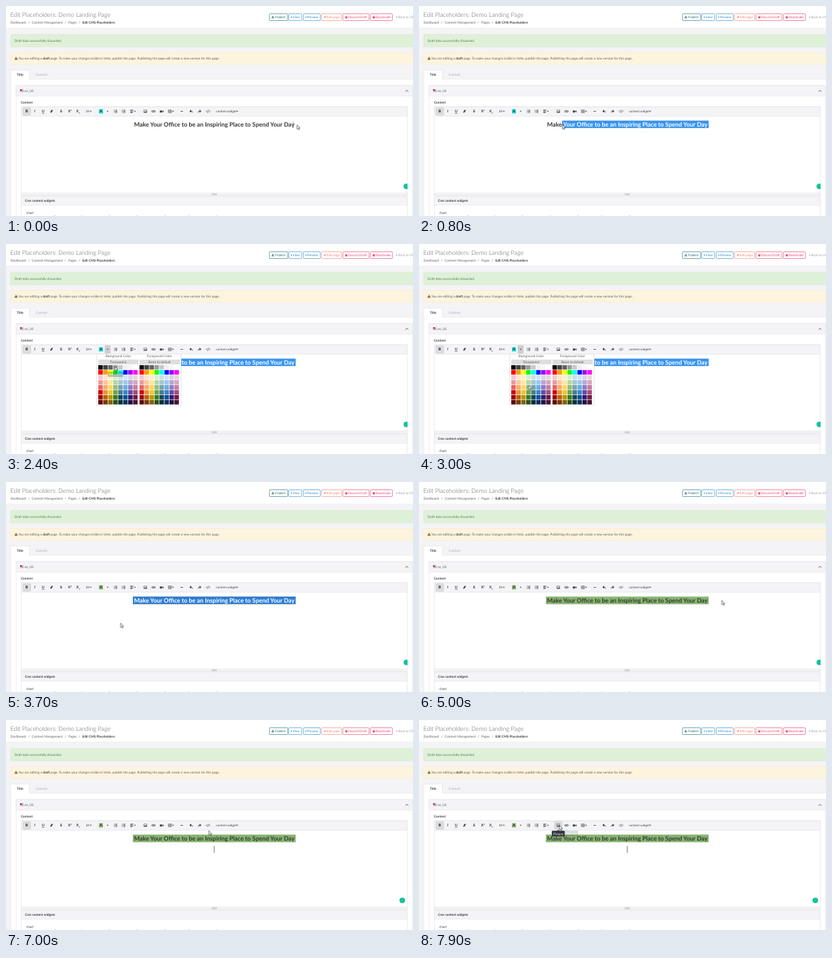
Write an HTML page that moves like this. It is 600 by 310 pixels and loops after 8 s.

```html
<!DOCTYPE html>
<html lang="en">
<head>
<meta charset="utf-8">
<title>Editor: text background colour</title>
<style>
html, body { margin: 0; width: 100%; height: 100%; overflow: hidden; background: #fff; }
svg { display: block; width: 600px; height: 310px; }
text { font: 4.78px Lato, sans-serif; fill: #555a5e; text-rendering: geometricPrecision; white-space: pre; }
.b { font-weight: 700; fill: #33373a; }
.mid { text-anchor: middle; }
.title { font-size: 8.95px; font-weight: 300; }
.line { fill: none; stroke: #3c4043; stroke-width: .8; }
.ico { fill: #3c4043; }
.box { stroke: #e4e4e7; stroke-width: .7; }
.head { font-size: 8.88px; font-weight: 700; text-anchor: middle; fill: inherit; }
.tip rect, .tip path { fill: #30353d; }
.tip text { fill: #fff; text-anchor: middle; }

/* One loop is 8 s: 1% = 80 ms */
.a { animation: 8s linear infinite; }
.hard { animation: 8s step-end infinite; }

#cursor { animation-name: cursor; animation-timing-function: ease-in-out; }
@keyframes cursor {
  0%, 3% { transform: translate(429px, 175.5px); }
  12% { transform: translate(187px, 175px); }
  14% { transform: translate(186px, 174px); }
  19%, 24% { transform: translate(149px, 153px); }
  29%, 32% { transform: translate(160.5px, 181px); }
  38%, 41.5% { transform: translate(161.5px, 209px); }
  45.5%, 47% { transform: translate(168.8px, 208.3px); }
  58%, 64% { transform: translate(446.5px, 174.8px); }
  70%, 81% { transform: translate(445.5px, 173.8px); }
  92% { transform: translate(222px, 158px); }
  95% { transform: translate(217px, 156px); }
  97%, 100% { transform: translate(207px, 156px); }
}
#sel { animation-name: drag, selOff; animation-duration: 8s; animation-iteration-count: infinite; animation-timing-function: ease-in-out, step-end; }
@keyframes drag {
  0%, 3% { clip-path: inset(0 0 0 100%); }
  12%, 100% { clip-path: inset(0 0 0 0); }
}
@keyframes selOff { 0% { visibility: visible; } 59.4%, 100% { visibility: hidden; } }
#selBox { animation-name: selTone; }
@keyframes selTone { 0% { fill: #3994ee; } 41.25%, 100% { fill: #2f7dd3; } }
#mark { animation-name: mark; }
@keyframes mark { 0% { visibility: hidden; } 41.25%, 100% { visibility: visible; } }
#swatch { animation-name: swatch; }
@keyframes swatch { 0% { fill: #1fe3dc; } 41.25%, 100% { fill: #94bd7b; } }
#menu { animation-name: menu; }
@keyframes menu { 0%, 41.25%, 100% { visibility: hidden; } 23.75% { visibility: visible; } }
#more { animation-name: more; }
@keyframes more { 0%, 41.25%, 100% { visibility: hidden; } 18% { visibility: visible; } }
#moreTip { animation-name: moreTip; }
@keyframes moreTip { 0%, 18.5%, 25%, 100% { opacity: 0; } 20.5%, 23.5% { opacity: 1; } }
#toneTip { animation-name: toneTip; }
@keyframes toneTip { 0%, 29%, 33%, 100% { opacity: 0; } 30%, 31.5% { opacity: .3; } }
#ibeam { animation-name: ibeam; }
@keyframes ibeam { 0% { visibility: visible; } 1.25%, 100% { visibility: hidden; } }
#caret { animation-name: caret; }
@keyframes caret {
  0%, 76.6%, 89.9% { visibility: hidden; }
  70%, 83.2%, 96.5%, 100% { visibility: visible; }
}
#dot { animation-name: dot; animation-timing-function: ease-in-out; }
@keyframes dot { 0%, 75% { transform: none; } 79%, 100% { transform: translateX(-6px); } }
#link { animation-name: link; }
@keyframes link { 0%, 96.2%, 100% { visibility: hidden; } 92.5% { visibility: visible; } }
#linkTip { animation-name: linkTip; }
@keyframes linkTip { 0%, 93%, 99.8%, 100% { opacity: 0; } 95%, 96.5% { opacity: .9; } 98.75% { opacity: .18; } }
#pic { animation-name: pic; }
@keyframes pic { 0% { visibility: hidden; } 96.2%, 100% { visibility: visible; } }
#picTip { animation-name: picTip; }
@keyframes picTip { 0%, 96.5% { opacity: 0; } 98.5%, 100% { opacity: 1; } }
</style>
</head>
<body>
<svg viewBox="0 0 600 310">
  <defs>
    <clipPath id="page"><rect x="22" y="163" width="569.5" height="112"/></clipPath>
    <text id="headline" class="head" x="307" y="178">Make Your Office to be an Inspiring Place to Spend Your Day</text>
    <path id="down" d="M-1.3-.7H1.3L0 .9Z"/>
  </defs>

  <!-- Page header -->
  <rect width="600" height="310" fill="#f4f3f5"/>
  <rect width="600" height="32.5" fill="#fff"/>
  <path d="M0 32.7H600" stroke="#e7eaec" stroke-width=".6"/>
  <text class="title" x="6.5" y="15.5">Edit Placeholders: Demo Landing Page</text>
  <text x="6.7" y="25.6">Dashboard</text><text x="32.8" y="25.6">/</text>
  <text x="38" y="25.6">Content Management</text><text x="86.5" y="25.6">/</text>
  <text x="92" y="25.6">Pages</text><text x="107.3" y="25.6">/</text>
  <text class="b" x="112.5" y="25.6">Edit CMS Placeholders</text>
  <g id="buttons"></g>

  <!-- Alerts -->
  <rect x="7" y="42" width="600" height="18.3" rx="1" fill="#dff0d8" stroke="#d3e7c4" stroke-width=".6"/>
  <text x="12.5" y="53" style="fill:#4b7b4c">Draft data successfully discarded.</text>
  <rect x="7" y="68.7" width="600" height="17.3" rx="1" fill="#fdf4de" stroke="#f8e8cb" stroke-width=".6"/>
  <path d="M12.3 79.3L14.8 74.7L17.3 79.3Z" fill="#6b5a35"/>
  <path d="M14.8 76V77.8M14.8 78.2V78.8" stroke="#fdf4de" stroke-width=".5"/>
  <text x="18.2" y="79">You are editing a <tspan class="b">draft</tspan> page. To make your changes visible in Velm, publish the page. Publishing the page will create a new version for this page.</text>

  <!-- Tabs and panels -->
  <rect class="box" x="7" y="108" width="600" height="210" fill="#fff"/>
  <path d="M7 109V94.5H34.5V109" fill="#fff"/>
  <path class="box" d="M7 108V94.5H34.5V108" fill="none"/>
  <text class="b" x="16" y="102.8">Title</text>
  <text x="44" y="102.8" style="fill:#a7acb8">Content</text>
  <rect class="box" x="15" y="117.5" width="584" height="200" fill="#fff"/>
  <rect class="box" x="15" y="117.5" width="584" height="15.5" fill="#f4f4f6"/>
  <g stroke-width=".55">
    <rect x="20.8" y="123" width="5" height="3.6" fill="#fff"/>
    <path d="M20.8 123.3h5m-5 1.1h5m-5 1.1h5m-5 1.1h5" stroke="#c8475a"/>
    <path d="M20.8 123h2.4v2h-2.4z" fill="#3c4a80"/>
  </g>
  <text x="27.2" y="126.6">en_US</text>
  <path class="line" d="M589 126.5L591 124.3L593 126.5"/>
  <text class="b" x="22" y="144.3">Content</text>
  <rect class="box" x="22.3" y="148.8" width="569" height="130.6" fill="#fff"/>
  <rect class="box" x="22.3" y="148.8" width="569" height="14" fill="#f4f4f6"/>
  <rect class="box" x="22.3" y="276" width="569" height="3.5" fill="#f4f4f6"/>
  <path d="M303 277h8m-8 .9h8m-8 .9h8" stroke="#a9a9ad" stroke-width=".45"/>
  <rect class="box" x="22.3" y="281" width="569" height="40" fill="#fff"/>
  <rect class="box" x="22.3" y="281" width="569" height="13" fill="#f4f4f6"/>
  <text class="b" x="28" y="289.3">Cms content widgets</text>
  <text x="30" y="306.8" style="fill:#33373a">chart</text>
  <path d="M71 309.8h2m38 0h1.5m39 0h2m39 0h2m39 0h2m33 0h2m39 0h2" stroke="#888" stroke-width=".5"/>

  <!-- Toolbar -->
  <rect x="25" y="150" width="11.3" height="11.2" rx="1" fill="#dcdcdf" stroke="#c6c6ca" stroke-width=".5"/>
  <rect id="more" class="hard" x="146" y="150" width="7.6" height="11.2" rx="1" fill="#cfcfd3" stroke="#b4b4b8" stroke-width=".5"/>
  <rect id="pic" class="hard" x="199.5" y="150" width="11.5" height="11.2" rx="1" fill="#dcdcdf" stroke="#c6c6ca" stroke-width=".5"/>
  <rect id="link" class="hard" x="212" y="150" width="11.5" height="11.2" rx="1" fill="#dcdcdf"/>
  <rect id="swatch" class="hard" x="137" y="152.3" width="6" height="6.4"/>
  <g id="letters"></g>
  <g class="ico">
    <path d="M64.8 157.3L67 153.6H69.4L67.2 157.3Z"/>
    <path d="M202.8 153.4h5.2v4.2h-5.2zM203.4 154v3h4v-3z" fill-rule="evenodd"/>
    <path d="M203.5 157L204.8 155.3L205.7 156.2L206.5 155L207.4 157Z"/>
    <path d="M226.8 154.2h3.3v3h-3.3zM230.1 155.6L232.2 154.1V157.3Z"/>
    <path d="M270.3 155.3L273 153V157.6ZM288 155.3L285.3 153V157.6Z"/>
    <use href="#down" x="125" y="155.5"/><use href="#down" x="149.9" y="155.5"/>
    <use href="#down" x="190" y="155.5"/><use href="#down" x="246.3" y="155.5"/>
    <use href="#down" x="341" y="155.5"/>
  </g>
  <g class="line">
    <path d="M160.8 153.8h3.2m-3.2 1.7h3.2m-3.2 1.7h3.2M159 153.8h.9m-.9 1.7h.9m-.9 1.7h.9"/>
    <path d="M172.8 153.8h3.2m-3.2 1.7h3.2m-3.2 1.7h3.2M171.3 153.3v1.2m0 .5v1.1m0 .5v1.1"/>
    <path d="M183.3 153.6h4.4m-4.4 1.3h3m-3 1.3h4.4m-4.4 1.3h3"/>
    <rect x="214.8" y="154.4" width="2.8" height="2.2" rx="1.1"/><rect x="217.3" y="154.4" width="2.8" height="2.2" rx="1.1"/>
    <path d="M239.4 153.5h4.6v4.1h-4.6zM239.4 155.5h4.6m-2.3-2v4" stroke-width=".6"/>
    <path d="M257.2 155.5h3.8"/>
    <path d="M272.5 155.2q2.7-.2 2.6 2.2M285.8 155.2q-2.7-.2-2.6 2.2"/>
    <path d="M296.6 153.8l-1.6 1.7l1.6 1.7m2.7-3.4l1.6 1.7l-1.6 1.7m-.8-3.8l-1.2 4.2" stroke-width=".65"/>
  </g>
  <text x="309.5" y="157" style="fill:#3c4043;font-size:4.6px">content widget</text>

  <!-- Editor -->
  <rect id="mark" class="hard" x="187" y="169.2" width="240" height="11.2" fill="#87b46d"/>
  <use href="#headline" fill="#34373a"/>
  <g id="sel">
    <rect id="selBox" class="hard" x="187" y="169.2" width="240" height="11.2"/>
    <use href="#headline" fill="#fff"/>
  </g>
  <path id="ibeam" class="hard" d="M423.7 170V180" stroke="#777" stroke-width=".6"/>
  <path id="caret" class="hard" d="M307 185.8V196" stroke="#333" stroke-width=".7"/>
  <g clip-path="url(#page)"><circle id="dot" class="a" cx="590.2" cy="266.3" r="4.1" fill="#15c39a"/></g>

  <!-- Colour menu -->
  <g id="menu" class="hard">
    <rect x="133.8" y="162.3" width="124.4" height="76" rx=".8" fill="#fff" stroke="#cfcfd2" stroke-width=".6"/>
    <g id="palettes"></g>
  </g>
  <g id="toneTip" class="a tip">
    <rect x="150" y="188.5" width="23" height="7.6" rx="1"/><text x="161.5" y="194">#9C9C94</text>
  </g>

  <!-- Tooltips -->
  <g id="moreTip" class="a tip">
    <path d="M148 164L149.8 162L151.6 164Z"/><rect x="136" y="163.6" width="27.6" height="8.2" rx="1"/>
    <text x="149.8" y="169.5">More Color</text>
  </g>
  <g id="linkTip" class="a tip">
    <path d="M215.7 164L217.5 162L219.3 164Z"/><rect x="200.5" y="163.6" width="34" height="8.2" rx="1"/>
    <text x="217.5" y="169.5">Link (CTRL+K)</text>
  </g>
  <g id="picTip" class="a tip">
    <path d="M203.5 164L205.3 162L207.1 164Z"/><rect x="195.8" y="163.6" width="19" height="8.2" rx="1"/>
    <text x="205.3" y="169.5">Picture</text>
  </g>
  <path id="cursor" class="a" d="M0 0V6.3L1.5 5L2.6 7.3L3.6 6.8L2.6 4.6H4.5Z" fill="#fff" stroke="#222" stroke-width=".6"/>
</svg>
<script>
const NS = 'http://www.w3.org/2000/svg';
const byId = id => document.getElementById(id);

function add(parent, tag, attrs, text) {
  const el = document.createElementNS(NS, tag);
  for (const key in attrs) el.setAttribute(key, attrs[key]);
  if (text) el.textContent = text;
  parent.append(el);
}

// Header buttons: label, left, width, label offset, colour, icon path
const play = 'M0-1.4L1.6 0L0 1.4Z', pen = 'M0 1.6L.5.2L2.7-1.8L3.6-.9L1.4 1.2Z';
const upload = 'M0 .5H3.8V1.7H0ZM1.3.2V-.6H.4L1.9-2L3.4-.6H2.5V.2Z';
const bin = 'M0-1.6H3.6V-.9H0ZM.4-.5H3.2V1.8H.4Z';
[
  ['Publish', 388.3, 27, 8.8, '#1d6a72', upload],
  ['View', 416.8, 19, 5.8, '#2487c4', play],
  ['Preview', 438.3, 25, 5.4, '#2487c4', play],
  ['Edit page', 465.2, 29.4, 7.6, '#ec8273', pen],
  ['Discard Draft', 496.7, 38.4, 7.6, '#ea4263', bin],
  ['Deactivate', 537.2, 32.4, 7.6, '#ea3263', bin],
  ['Back to CMS', 571.5, 40, 6.8, '#9a9ea6', 'M1.8-1.4L.2 0L1.8 1.4Z']
].forEach(([label, x, w, dx, color, icon]) => {
  const g = byId('buttons');
  if (x < 570) add(g, 'rect', { x, y: 11.5, width: w, height: 10, rx: 1, fill: '#fff', stroke: color, 'stroke-width': .6 });
  add(g, 'path', { d: icon, fill: color, transform: `translate(${x + 3.2} 16.4)` });
  add(g, 'text', { x: x + dx, y: 18.1, style: `fill:${color};font-size:4.7px` }, label);
});

// Toolbar letters: text, centre, extra style
[
  ['B', 30.6, 'font-weight:900'], ['I', 42.3, 'font-style:italic;font-weight:700'],
  ['U', 54.8, 'text-decoration:underline'], ['S', 81.2, 'text-decoration:line-through'],
  ['X', 93.3, ''], ['X', 105.3, ''], ['24', 120.3, 'font-weight:400;font-size:4.6px'], ['A', 140, 'font-weight:900']
].forEach(([s, x, extra]) =>
  add(byId('letters'), 'text', { x, y: 157.3, class: 'b mid', style: 'font-size:5.4px;' + extra }, s));
add(byId('letters'), 'text', { x: 95.3, y: 155.3, class: 'b', style: 'font-size:2.8px' }, '2');
add(byId('letters'), 'text', { x: 107.3, y: 158.6, class: 'b', style: 'font-size:2.8px' }, '2');

const tones = `000000 424242 636363 9c9c94 cec6ce efefef f7f7f7 ffffff
ff0000 ff9c00 ffff00 00ff00 00ffff 0000ff 9c00ff ff00ff
f7c6ce ffe7ce ffefc6 d6efd6 cedee7 cee7f7 d6d6e7 e7d6de
e79c9c ffc69c ffe79c b5d6a5 a5c6ce 9cc6ef b5a5d6 d6a5bd
e76363 f7ad6b ffd663 94bd7b 73a5ad 6badde 8c7bc6 c67ba5
ce0000 e79439 efc631 6ba54a 4a7b8c 3984c6 634aa5 a54a7b
9c0000 b56308 bd9400 397b21 104a5a 085294 311873 731842
630000 7b3900 846300 295218 083139 003163 21104a 4a1031`.split(/\s+/);

function palette(x, name, reset) {
  const g = byId('palettes'), mid = x + 29.4, step = 7.35;
  add(g, 'text', { x: mid, y: 167.3, class: 'mid' }, name);
  add(g, 'rect', { x: x + .4, y: 171, width: 58.6, height: 6.2, rx: .8, fill: '#dededf', stroke: '#cacacc', 'stroke-width': .4 });
  add(g, 'text', { x: mid, y: 175.8, class: 'mid' }, reset);
  tones.forEach((tone, i) => add(g, 'rect', {
    x: x + i % 8 * step, y: 178.8 + (i >> 3) * step, width: 6.6, height: 6.6, fill: '#' + tone
  }));
}
palette(136, 'Background Color', 'Transparent');
palette(196.8, 'Foreground Color', 'Reset to default');
</script>
</body>
</html>
```
